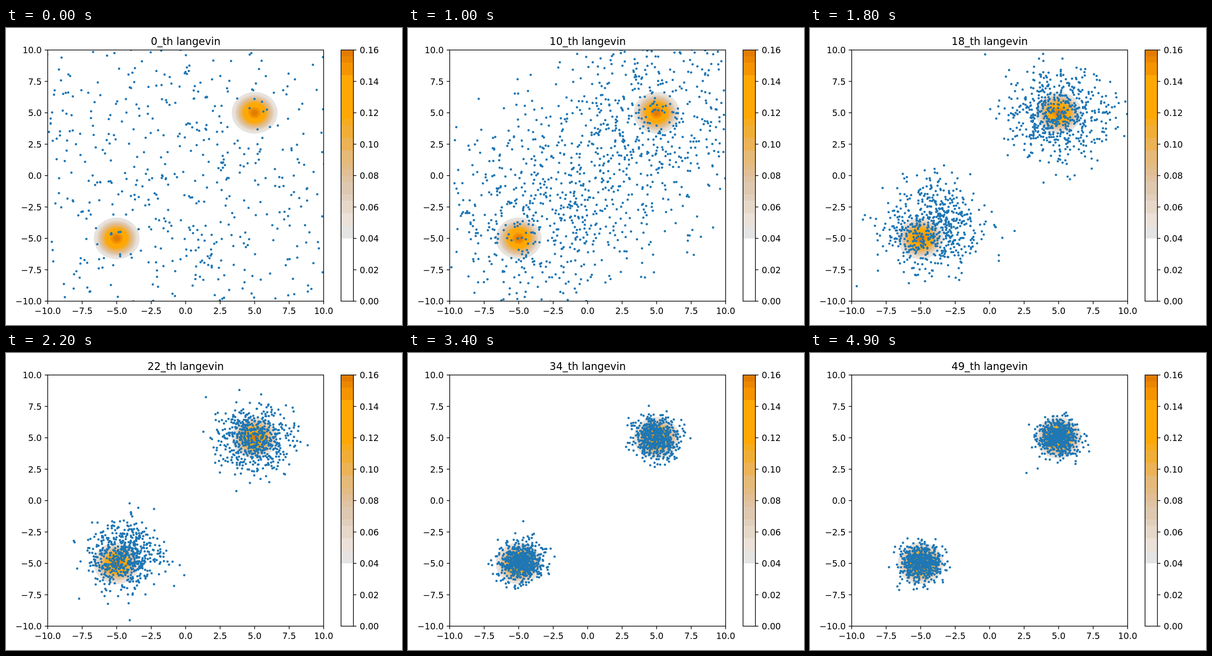
Animation, 864 px wide and 648 px high, one loop 5 s. Source, as an HTML page with a canvas:

```html
<!DOCTYPE html>
<html lang="en">
<head>
<meta charset="utf-8">
<title>Langevin sampling</title>
<style>
  html, body { margin: 0; width: 100%; height: 100%; overflow: hidden; background: #fff; }
  canvas { display: block; }
</style>
</head>
<body>
<canvas id="plot" width="864" height="648"></canvas>
<script>
const ctx = document.getElementById('plot').getContext('2d');
const FONT = '"DejaVu Sans", sans-serif';
const STEPS = 50, STEP_MS = 100, COUNT = 1180, RATE = 0.1;
const box = { l: 91, r: 693, t: 48, b: 596 };
const bar = { l: 731, r: 758 };

// Lower density bound and colour of each filled band
const bands = [
  [0.040, '#e5e4e2'], [0.048, '#ebe1d8'], [0.056, '#e6d8c9'], [0.064, '#e1cfbd'],
  [0.068, '#dec8b0'], [0.076, '#dfc3a2'], [0.080, '#e1be94'], [0.084, '#e3bb85'],
  [0.088, '#e5b977'], [0.096, '#ecb256'], [0.104, '#f0ae36'], [0.112, '#f7ab1e'],
  [0.116, '#ffa805'], [0.144, '#f59400'], [0.152, '#ea8600'], [0.156, '#e27c00']
];

const px = x => box.l + (x + 10) / 20 * (box.r - box.l);
const py = y => box.b - (y + 10) / 20 * (box.b - box.t);
const barY = d => box.b - d / 0.16 * (box.b - box.t);

let seed = 20417;
function rand() {
  seed = (seed + 0x6D2B79F5) | 0;
  let t = Math.imul(seed ^ (seed >>> 15), 1 | seed);
  t = (t + Math.imul(t ^ (t >>> 7), 61 | t)) ^ t;
  return ((t ^ (t >>> 14)) >>> 0) / 4294967296;
}
const gauss = () => Math.sqrt(-2 * Math.log(1 - rand())) * Math.cos(2 * Math.PI * rand());

// Noisy drift toward two modes; the split between them sharpens as it cools
function simulate() {
  let pts = Array.from({ length: COUNT }, () => [10.8 * gauss(), 10.8 * gauss()]);
  const runs = [pts];
  const kick = Math.sqrt(RATE * 1.1);
  for (let n = 1; n < STEPS; n++) {
    const heat = 1 / (1 + Math.exp((n - 10.5) * 1.2));
    const width = 1 + 62 * heat;
    pts = pts.map(([x, y]) => {
      const mode = 5 * Math.tanh(5 * (x + y - 1.4) / width) + 1.3 * heat;
      return [x + RATE * (mode - x) + kick * gauss(), y + RATE * (mode - y) + kick * gauss()];
    });
    runs.push(pts);
  }
  return runs;
}
const runs = simulate();

function text(str, x, y, align, size = 18.75) {
  ctx.font = size + 'px ' + FONT;
  ctx.textAlign = align;
  ctx.fillText(str, x, y);
}

function line(x1, y1, x2, y2) {
  ctx.beginPath();
  ctx.moveTo(x1, y1);
  ctx.lineTo(x2, y2);
  ctx.stroke();
}

function drawDensity() {
  for (const [level, color] of bands) {
    const r = Math.sqrt(-2 * Math.log(2 * Math.PI * level));
    ctx.fillStyle = color;
    for (const m of [-5, 5]) {
      ctx.beginPath();
      ctx.ellipse(px(m), py(m), r * 30.1, r * 27.4, 0, 0, 2 * Math.PI);
      ctx.fill();
    }
  }
}

function drawDots(pts) {
  ctx.save();
  ctx.beginPath();
  ctx.rect(box.l, box.t, box.r - box.l, box.b - box.t);
  ctx.clip();
  ctx.fillStyle = '#1f77b4';
  ctx.beginPath();
  for (const [x, y] of pts) {
    const cx = px(x), cy = py(y);
    ctx.moveTo(cx + 2.5, cy);
    ctx.arc(cx, cy, 2.5, 0, 2 * Math.PI);
  }
  ctx.fill();
  ctx.restore();
}

function drawAxes() {
  ctx.fillStyle = ctx.strokeStyle = '#000';
  ctx.lineWidth = 1.5;
  ctx.strokeRect(box.l, box.t, box.r - box.l, box.b - box.t);
  for (let v = -10; v <= 10; v += 2.5) {
    const label = v.toFixed(1).replace('-', '\u2212');
    const x = px(v), y = py(v);
    line(x, box.b, x, box.b + 6.5);
    line(box.l, y, box.l - 6.5, y);
    text(label, x, 623.5, 'center');
    text(label, 78, y + 7, 'right');
  }
}

function drawBar() {
  for (const [level, color] of bands) {
    const y = barY(level);
    ctx.fillStyle = color;
    ctx.fillRect(bar.l, box.t, bar.r - bar.l, y - box.t);
  }
  ctx.fillStyle = '#000';
  ctx.strokeRect(bar.l, box.t, bar.r - bar.l, box.b - box.t);
  for (let i = 0; i <= 8; i++) {
    const y = barY(i * 0.02);
    line(bar.r, y, bar.r + 6.5, y);
    text((i * 0.02).toFixed(2), 771.8, y + 7, 'left');
  }
}

function draw() {
  const n = Math.floor(performance.now() / STEP_MS) % STEPS;
  ctx.fillStyle = '#fff';
  ctx.fillRect(0, 0, 864, 648);
  drawDensity();
  drawDots(runs[n]);
  drawAxes();
  drawBar();
  text(n + '_th langevin', (box.l + box.r) / 2, 36.7, 'center', 22.5);
  requestAnimationFrame(draw);
}
draw();
</script>
</body>
</html>
```
